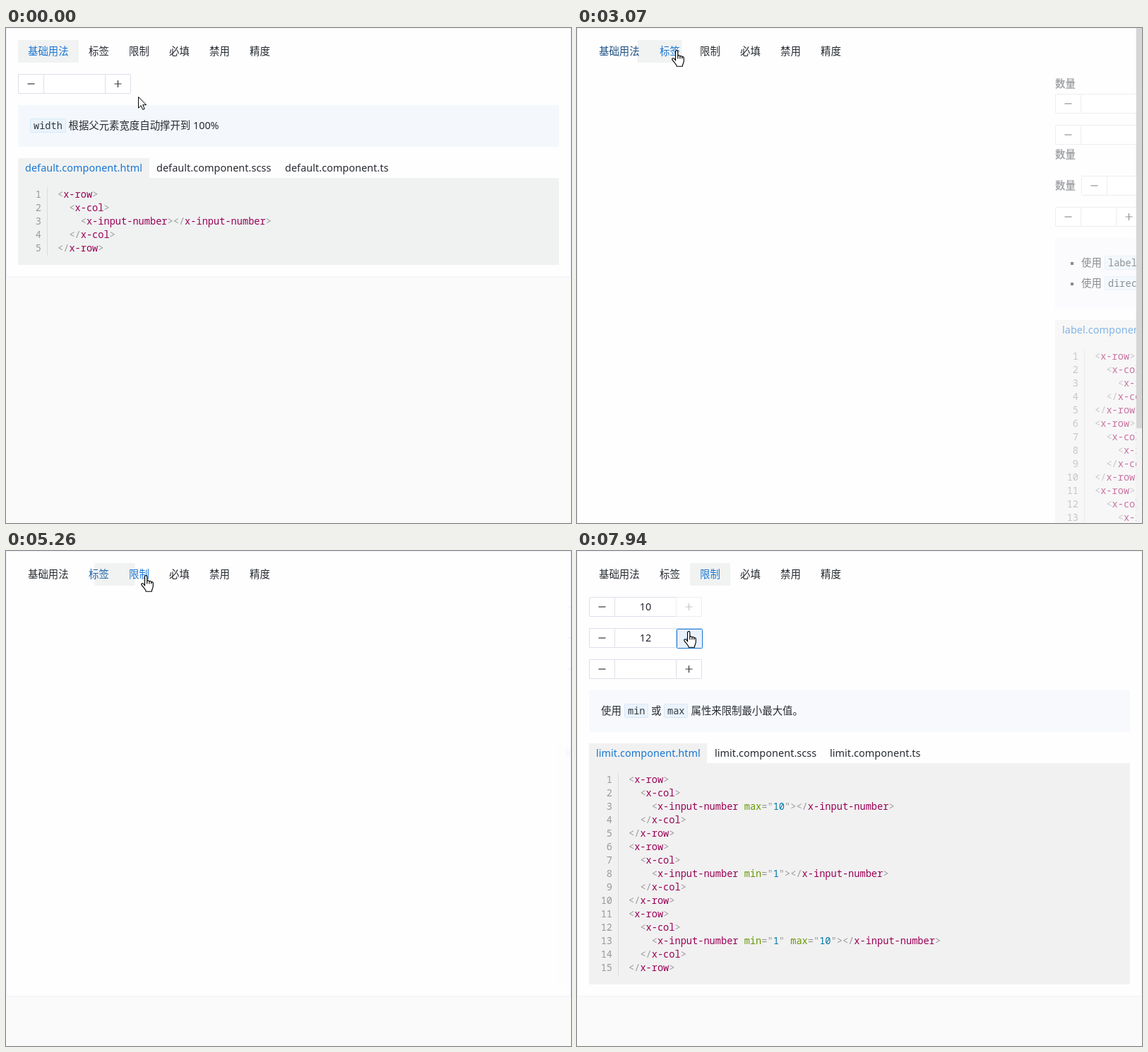
Write an HTML page that moves like this. It is 800 px wide and 700 px high and loops after 8000 ms.

```html
<!DOCTYPE html>
<html lang="zh">
<head>
<meta charset="utf-8">
<title>Input number</title>
<style>
  html, body { margin: 0; width: 100%; height: 100%; overflow: hidden; background: #fafafa; }
  svg { display: block; }
  text { font: 14.4px "Noto Sans", "Noto Sans CJK SC", sans-serif; fill: #262a30; white-space: pre; }
  .file { letter-spacing: .07px; }
  .on { fill: #1976d2; }
  .label { font-weight: 600; fill: #5c5f64; }
  .mid { text-anchor: middle; }
  .code, .num, .chip { font: 13.6px "Noto Sans Mono", "Noto Sans CJK SC", monospace; letter-spacing: .03px; }
  .chip { fill: #303840; }
  .num { fill: #999; text-anchor: end; }
  .p { fill: #999; }
  .t { fill: #905; }
  .n { fill: #690; }
  .v { fill: #07a; }
  .han { font-size: 14.4px; }
  .box { fill: #fff; stroke: #dcdfe8; }
  .ico { fill: none; stroke: #33373d; stroke-width: 1.2; }
  .hover { fill: #f4f9ff; stroke: #d3e0f0; }
  .press .box { fill: #e8f1fc; stroke: #1976d2; }
  .press .ico { stroke: #1976d2; }
  .off .box { stroke: #eceef5; }
  .off .ico { stroke: #c3c6cc; }
</style>
</head>
<body>
<svg id="stage" width="800" height="700" viewBox="0 0 800 700"></svg>
<script>
const LOOP = 8000;
const tabs = [['基础用法', 17, 86], ['标签', 103, 57], ['限制', 160, 57],
              ['必填', 217, 57], ['禁用', 274, 57], ['精度', 331, 57]];
const controls = [
  { id: 'a1', view: 0, x: 17, y: 65, w: 160 },
  { id: 'b1', view: 1, x: 17, y: 93, w: 160 },
  { id: 'b2', view: 1, x: 17, y: 137, w: 160 },
  { id: 'b3', view: 1, x: 54, y: 209, w: 123 },
  { id: 'b4', view: 1, x: 17, y: 253, w: 123 },
  { id: 'c1', view: 2, x: 17, y: 65, w: 160 },
  { id: 'c2', view: 2, x: 17, y: 109, w: 160 },
  { id: 'c3', view: 2, x: 17, y: 153, w: 160 }
];
// Held buttons: one count per "every" ms up to "max" counts
const holds = [
  { id: 'a1', side: 'plus', from: 560, to: 1200, fade: 300, every: 43, max: 15 },
  { id: 'a1', side: 'minus', from: 1690, to: 2240, fade: 250, every: 45, max: 11 },
  { id: 'b1', side: 'plus', from: 3860, to: 4200, fade: 250, every: 45, max: 8 },
  { id: 'c1', side: 'plus', from: 6140, to: 6590, fade: 160, every: 45, max: 10 },
  { id: 'c2', side: 'plus', from: 7380, to: 8000, fade: 250, every: 50, max: 12 }
];
const switches = [{ click: 2947, enter: 3011, shift: 758 }, { click: 5200, enter: 5252, shift: 767 }];
// Pointer path: time, x, y
const path = [
  [0, 187, 97], [70, 187, 97], [390, 158, 78], [1170, 158, 78], [1340, 111, 90],
  [1430, 111, 90], [1660, 36, 80], [2270, 36, 80], [2800, 141, 31], [3150, 141, 31],
  [3700, 157, 100], [4220, 157, 100], [4700, 186, 32], [4970, 186, 32], [5150, 198, 34],
  [5280, 198, 34], [5580, 190, 78], [5730, 190, 78], [6060, 172, 84], [6590, 172, 84],
  [6750, 167, 84], [6980, 167, 84], [7210, 158, 113], [8000, 158, 113]
];

const clamp = v => Math.max(0, Math.min(1, v));
const ramp = (t, a, b) => clamp((t - a) / (b - a));
const mix = (a, b, k) => a + (b - a) * k;
const bezier = (x1, y1, x2, y2) => {
  const at = (a, b, s) => 3 * a * s * (1 - s) ** 2 + 3 * b * s * s * (1 - s) + s ** 3;
  return x => {
    let lo = 0, hi = 1;
    for (let i = 0; i < 20; i++) {
      const m = (lo + hi) / 2;
      if (at(x1, x2, m) < x) lo = m; else hi = m;
    }
    return x <= 0 ? 0 : x >= 1 ? 1 : at(y1, y2, lo);
  };
};
const ease = bezier(.25, .1, .25, 1);
const easeInOut = bezier(.42, 0, .58, 1);

const esc = s => s.replace(/</g, '&lt;').replace(/>/g, '&gt;');
const text = (x, y, s, cls = '') => `<text x="${x}" y="${y}" class="${cls}">${s}</text>`;
const rect = (x, y, w, h, fill) => `<rect x="${x}" y="${y}" width="${w}" height="${h}" fill="${fill}"/>`;
const box = (x, y, w, h, cls) =>
  `<rect x="${x + .5}" y="${y + .5}" width="${w - 1}" height="${h - 1}" rx="1" class="${cls}"/>`;
const chip = (x, mid, s) => {
  const w = Math.round(s.length * 8.16 + 10);
  return `<rect x="${x + .5}" y="${mid - 9.5}" width="${w - 1}" height="19" rx="1" fill="#eaf3fc" stroke="#d9e8f7"/>`
    + text(x + 5, mid + 5, s, 'chip');
};

function button(id, x, y, side) {
  const icon = `<path class="ico" d="M${x + 13.5} ${y + 14}h10${side === 'plus' ? 'm-5 -5v10' : ''}"/>`;
  const face = box(x, y, 37, 28, 'box') + icon;
  const key = `${id}-${side}`;
  return face
    + `<g id="${key}-hover" opacity="0">${box(x, y, 37, 28, 'hover')}${icon}</g>`
    + `<g id="${key}-off" class="off" opacity="0">${face}</g>`
    + `<g id="${key}-press" class="press" opacity="0" transform="translate(1 1)">${face}</g>`;
}
function control({ id, x, y, w }) {
  return box(x, y, w, 28, 'box') + button(id, x, y, 'minus') + button(id, x + w - 37, y, 'plus')
    + `<text id="${id}-value" x="${x + w / 2}" y="${y + 19}" class="mid"></text>`;
}
const controlsOf = v => controls.filter(c => c.view === v).map(control).join('');

const paint = line => line.replace(/(<\/?|>|=)|([\w-]+)(?==)|"([^"]*)"|([\w-]+)/g, (m, punct, attr, val, tag) => {
  const span = (c, s) => `<tspan class="${c}">${esc(s)}</tspan>`;
  if (punct) return span('p', punct);
  if (attr) return span('n', attr);
  if (tag) return span('t', tag);
  return span('p', '"') + span(/^[\w-]+$/.test(val) ? 'v' : 'v han', val) + span('p', '"');
});
const sample = attrs => ['<x-row>', '  <x-col>', `    <x-input-number${attrs}></x-input-number>`, '  </x-col>', '</x-row>'];

function source(y, name, xs, width, right, fill, rows) {
  const lines = rows.flatMap(sample);
  let out = rect(17, y, width, 29, fill) + rect(17, y + 28, right - 17, lines.length * 19 + 28, fill);
  ['html', 'scss', 'ts'].forEach((ext, i) =>
    out += text(xs[i], y + 19, `${name}.component.${ext}`, i ? 'file' : 'file on'));
  out += rect(58, y + 42, 1, lines.length * 19 + 1, '#d9dcdf');
  lines.forEach((line, i) => {
    const base = y + 56 + i * 19;
    out += text(50, base, i + 1, 'num') + text(73, base, paint(line), 'code');
  });
  return out;
}

const note = (y, w, h, fill) => rect(17, y, w, h, fill);
const panels = [
  controlsOf(0) + note(109, 766, 59, '#f4f8fc') + chip(34, 138, 'width')
    + text(88.5, 143, '根据父元素宽度自动撑开到 100%')
    + source(184, 'default', [27, 213, 395], 186, 783, '#f0f2f2', ['']),
  text(17, 84, '数量', 'label') + text(17, 184, '数量', 'label') + text(17, 228, '数量', 'label')
    + text(148, 272, '数量', 'label') + controlsOf(1) + note(297, 758, 100, '#f7f8fb')
    + rect(39, 331, 4, 4, '#262a30') + text(54, 337, '使用') + chip(87, 332, 'label') + text(142, 337, '属性设置显示文本标签。')
    + rect(39, 360, 4, 4, '#262a30') + text(54, 366, '使用') + chip(87, 361, 'direction') + text(174.5, 366, '属性设置排版方式。')
    + source(413, 'label', [27, 197, 363], 170, 775, '#f1f1f1',
        [' label="数量"', ' label="数量" direction="column-reverse"', ' label="数量" direction="row"']),
  controlsOf(2) + note(197, 766, 59, '#f7f9fc') + text(34, 231, '使用') + chip(67, 226, 'min')
    + text(105, 231, '或') + chip(123, 226, 'max') + text(161.5, 231, '属性来限制最小最大值。')
    + source(272, 'limit', [27, 195, 358], 167, 783, '#f1f1f1', [' max="10"', ' min="1"', ' min="1" max="10"'])
];

const pointers = {
  arrow: '<path d="M.5 .5V16.2L4.2 12.7 6.7 18.4 9.2 17.3 6.7 11.7H11.6Z" fill="#fff" stroke="#000" stroke-linejoin="round"/>',
  hand: `<g transform="translate(-7 0)" stroke="#000" stroke-width="1.15" stroke-linejoin="round">
    <path fill="#fff" d="M5.5 15.5V2.3C5.5 .1 8.8 .1 8.8 2.3V8.6C9.4 7.2 11.7 7.4 11.9 9.2 12.6 8 14.6 8.4 14.8 10 15.6 9.2 17.3 9.8 17.3 11.5V15.5C17.3 18.5 15.5 19.5 15.3 23.2H7.2C7 20.5 4.5 18.6 1 14.2-.2 12.4 2 10.9 3.6 12.4L5.5 14.5"/>
    <path fill="none" d="M8.8 8.6V12.5M11.9 9.2V12.5M14.8 10V12.5"/></g>`,
  beam: '<path d="M-3.5 -7.5H-.5M1.5 -7.5H4.5M.5 -7V7M-3.5 7.5H-.5M1.5 7.5H4.5" fill="none" stroke="#000"/>'
};

document.getElementById('stage').innerHTML =
  rect(0, 0, 800, 700, '#fafafa')
  + '<rect id="card" x=".5" y=".5" fill="#fefefe" stroke="#f0f1fa"/>'
  + '<rect id="mark" y="17" height="32" rx="1" fill="#f1f2f2"/>'
  + tabs.map(([name, x], i) => `<text id="tab${i}" x="${x + 14}" y="38">${name}</text>`).join('')
  + panels.map((p, i) => `<g id="panel${i}">${p}</g>`).join('')
  + `<g id="bar">${rect(792, 0, 8, 700, '#f3f3f3')}${rect(792, 0, 8, 566, '#d6d6d6')}</g>`
  + Object.keys(pointers).map(k => `<g id="${k}">${pointers[k]}</g>`).join('');

const nodes = {};
document.querySelectorAll('[id]').forEach(n => nodes[n.id] = n);
const set = (id, attrs) => { for (const k in attrs) nodes[id].setAttribute(k, attrs[k]); };

function pointerAt(t) {
  const i = Math.max(1, path.findIndex(p => p[0] > t));
  const [a, b] = [path[i - 1], path[i]];
  const k = easeInOut(ramp(t, a[0], b[0]));
  return [mix(a[1], b[1], k), mix(a[2], b[2], k)];
}
const inside = (px, py, x, y, w, h) => px >= x && px < x + w && py >= y && py < y + h;

function drawPage(t, view, px, py) {
  const moves = switches.map(s => ramp(t, s.click, s.click + 250));
  let [, x, w] = tabs[0];
  moves.forEach((k, i) => {
    x = mix(x, tabs[i + 1][1], ease(k));
    w = mix(w, tabs[i + 1][2], ease(k));
  });
  set('mark', { x, width: w });
  tabs.forEach(([, tx, tw], i) => {
    const active = (i ? moves[i - 1] || 0 : 1) * (1 - (moves[i] || 0));
    const k = inside(px, py, tx, 17, tw, 32) ? 1 : active;
    const rgb = [[38, 25], [42, 118], [48, 210]].map(([a, b]) => Math.round(mix(a, b, k)));
    nodes['tab' + i].style.fill = `rgb(${rgb})`;
  });
  set('card', { width: view === 1 ? 791 : 799, height: [351, 720, 629][view] });
  set('bar', { visibility: view === 1 ? 'visible' : 'hidden' });
  panels.forEach((_, i) => {
    const come = switches[i - 1], go = switches[i];
    let opacity = come ? ramp(t, come.enter, come.enter + 110) : 1;
    if (go) opacity *= 1 - ramp(t, go.click, go.enter);
    const dx = come ? come.shift * (1 - easeInOut(ramp(t, come.enter, come.enter + 240))) : 0;
    set('panel' + i, { opacity, transform: `translate(${Math.round(dx)} 0)`, visibility: i === view ? 'visible' : 'hidden' });
  });
}

function drawControls(t, view, px, py) {
  let kind = tabs.some(([, x, w]) => inside(px, py, x, 17, w, 32)) ? 'hand' : 'arrow';
  controls.filter(c => c.view === view).forEach(({ id, x, y, w }) => {
    if (inside(px, py, x, y, w, 28)) kind = px < x + 37 || px >= x + w - 37 ? 'hand' : 'beam';
    let value = 0, touched = false;
    ['minus', 'plus'].forEach(side => {
      const left = side === 'plus' ? x + w - 37 : x;
      let press = 0;
      holds.filter(h => h.id === id && h.side === side && t >= h.from).forEach(h => {
        const n = Math.min(h.max, 1 + Math.floor((t - h.from) / h.every));
        value += side === 'plus' ? n : -n;
        touched = true;
        press = 1 - ramp(t, h.to, h.to + h.fade);
      });
      set(`${id}-${side}-hover`, { opacity: inside(px, py, left, y, 37, 28) ? 1 : 0 });
      set(`${id}-${side}-press`, { opacity: press });
    });
    nodes[id + '-value'].textContent = touched ? value : '';
  });
  set('c1-plus-off', { opacity: ramp(t, 6590, 6750) });
  Object.keys(pointers).forEach(k => set(k, {
    visibility: k === kind ? 'visible' : 'hidden',
    transform: `translate(${Math.round(px)} ${Math.round(py)})`
  }));
}

function draw(now) {
  const t = now % LOOP;
  const view = switches.filter(s => t >= s.enter).length;
  const [px, py] = pointerAt(t);
  drawPage(t, view, px, py);
  drawControls(t, view, px, py);
}
const start = performance.now();
function tick() {
  draw(performance.now() - start);
  requestAnimationFrame(tick);
}
tick();
</script>
</body>
</html>
```
